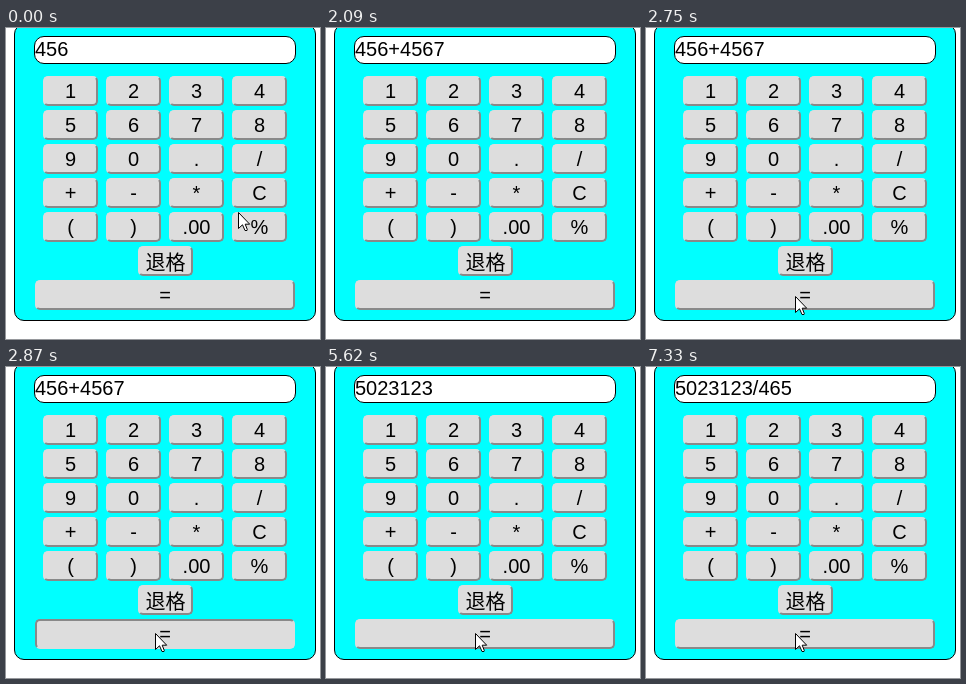
An HTML page that plays this animation: 314x311 px, repeating every 8 s.

```html
<!DOCTYPE html>
<html lang="zh">
<head>
<meta charset="utf-8">
<title>Calculator</title>
<style>
html, body { margin: 0; width: 100%; height: 100%; overflow: hidden; background: #fff; }
body { position: relative; font: 20px "Liberation Sans", Arial, sans-serif; color: #000; }
div, svg { position: absolute; box-sizing: border-box; }
#card { left: 8px; top: -4px; width: 302px; height: 297px; background: #0ff; border: 1px solid #000; border-radius: 10px; }
#display { left: 28px; top: 8px; width: 262px; height: 28px; background: #fff; border: 1px solid #000; border-radius: 10px; line-height: 25px; white-space: pre; }
.key { width: 55px; height: 30px; background: #ddd; border: 2px outset #ddd; border-radius: 5px; line-height: 27px; text-align: center; }
.key.down { border-style: inset; }
.cjk { font-family: "Noto Sans CJK SC", "Noto Sans CJK", sans-serif; font-weight: 300; }
#equals { width: 260px; }
</style>
</head>
<body>
<div id="card"></div>
<div id="display"></div>
<svg id="pointer" width="13" height="20" viewBox="0 0 13 20">
  <path d="M.5 .5V16.5L4.5 12.8L7 18.5H9L9.3 17.5L7.2 12.2H11.7Z" fill="#fff" stroke="#000"/>
</svg>
<script>
const LOOP = 8000;
const display = document.getElementById('display');
const pointer = document.getElementById('pointer');

function addKey(label, x, y) {
  const key = document.createElement('div');
  key.className = 'key';
  key.textContent = label;
  key.style.left = x + 'px';
  key.style.top = y + 'px';
  document.body.insertBefore(key, pointer);
  return key;
}

'1 2 3 4 5 6 7 8 9 0 . / + - * C ( ) .00 %'.split(' ').forEach((label, i) =>
  addKey(label, 37 + i % 4 * 63, 48 + Math.floor(i / 4) * 34));
addKey('退格', 132, 218).classList.add('cjk');
const equals = addKey('=', 29, 252);
equals.id = 'equals';

// Each entry: start time, value
const texts = [
  [0, '456'], [690, '456+'], [1250, '456+456'], [1530, '456+4567'],
  [3030, '5023'], [5620, '5023123'], [6740, '5023123/'],
  [7210, '5023123/46'], [7330, '5023123/465']
];
const places = [
  [0, [232, 184]], [2090, null], [2370, [229, 299]], [2490, [180, 293]],
  [2630, [154, 276]], [2750, [149, 268]], [2870, [149, 266]]
];

const at = (steps, t) => steps.filter(step => step[0] <= t).pop()[1];

function draw() {
  const t = performance.now() % LOOP;
  const place = at(places, t);
  display.textContent = at(texts, t);
  equals.classList.toggle('down', t >= 2870 && t < 3030);
  pointer.style.display = place ? 'block' : 'none';
  if (place) {
    pointer.style.left = place[0] + 'px';
    pointer.style.top = place[1] + 'px';
  }
  requestAnimationFrame(draw);
}
draw();
</script>
</body>
</html>
```
